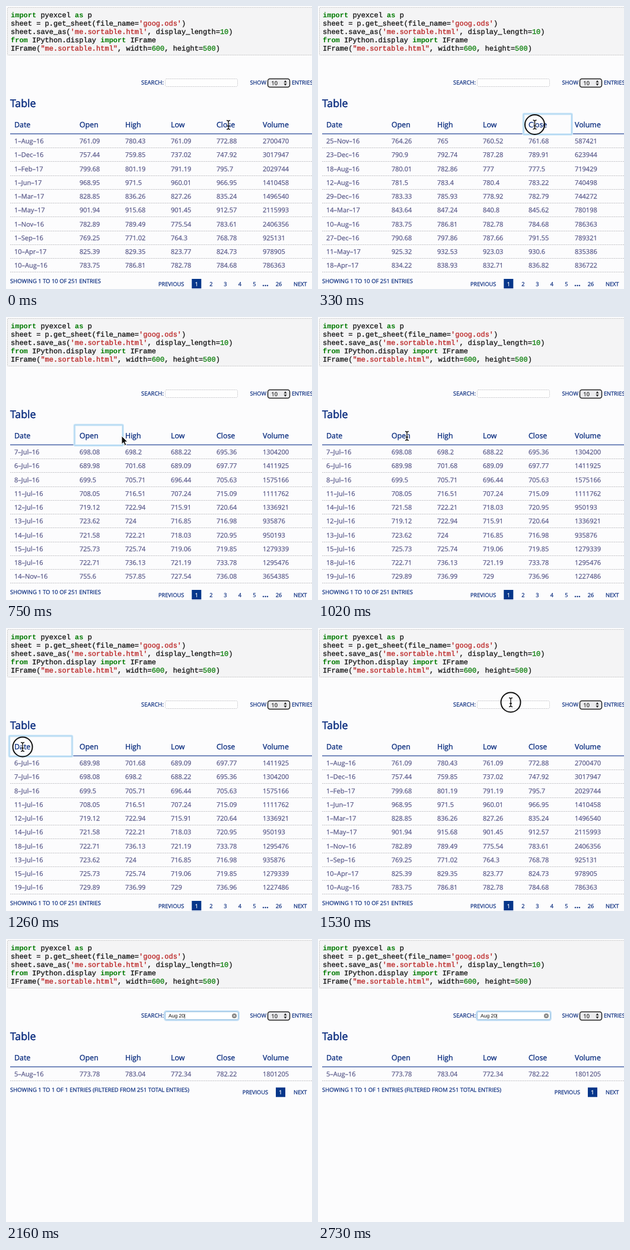
Animation of 516 by 476 pixels, one loop 2760 ms. Source, as an HTML page:

```html
<!DOCTYPE html>
<html lang="en">
<head>
<meta charset="utf-8">
<title>Sortable table</title>
<style>
  html, body { margin: 0; width: 100%; height: 100%; overflow: hidden; background: #fcfcfd; }
  svg { display: block; width: 516px; height: 476px; font-family: "Open Sans", "Noto Sans", sans-serif; }
  text { white-space: pre; fill: #0d2f80; stroke: #0d2f80; stroke-width: .25; text-rendering: geometricPrecision; }
  .code { font: 12px "Liberation Mono", "DejaVu Sans Mono", monospace; fill: #111; stroke: #111; stroke-width: .3; }
  .kw { font-weight: bold; fill: #007a00; stroke: none; }
  .str { fill: #ba2121; stroke: #ba2121; }
  .num { fill: #087d08; stroke: #087d08; }
  .title { font-size: 17.7px; stroke-width: .55; }
  .head { font-size: 12.4px; stroke-width: .35; }
  .cell { font-size: 11px; fill: #5a5a8a; stroke: #5a5a8a; }
  .small { font-size: 9.2px; }
  .on { fill: #fff; stroke: #fff; }
  .info { font-size: 9.45px; }
  .field { font: 8.5px "Liberation Sans", sans-serif; fill: #111; stroke: none; }
  .rule { stroke: #c4c4c8; stroke-dasharray: 2 1; }
  .ring { fill: none; stroke: #111; stroke-width: 2; }
</style>
</head>
<body>
<svg viewBox="0 0 516 476">
  <rect x="2.5" y="2.5" width="520" height="80" rx="1" fill="#f4f4f5" stroke="#c8c8c8" stroke-dasharray="2 1"/>
  <g id="code"></g>
  <text class="small" x="228" y="132" style="font-size:9.5px">SEARCH:</text>
  <text class="small" x="411.5" y="132">SHOW</text>
  <rect x="441.5" y="122.5" width="37" height="14" rx="3.5" fill="#ececee" stroke="#222" stroke-width="1.5"/>
  <text class="small" x="447.5" y="132.5" style="fill:#222;stroke:#222">10</text>
  <path d="M468.5 128.5l2.5-3.5 2.5 3.5zM468.5 130.5l2.5 3.5 2.5-3.5z" fill="#222"/>
  <text class="small" x="482" y="132">ENTRIES</text>
  <text class="title" x="7" y="170">Table</text>
  <g id="heads"></g>
  <path d="M7 215H516" stroke="#4a64a8" stroke-width="1.3"/>
  <g id="live"></g>
</svg>
<script>
const LOOP = 2760, STEP = 30, PITCH = 23.25, TOTAL = 251;
const columns = ['Date', 'Open', 'High', 'Low', 'Close', 'Volume'];
const colX = [14, 124, 201, 278, 355, 433];

const rows = `1-Aug-16 761.09 780.43 761.09 772.88 2700470
1-Dec-16 757.44 759.85 737.02 747.92 3017947
1-Feb-17 799.68 801.19 791.19 795.7 2029744
1-Jun-17 968.95 971.5 960.01 966.95 1410458
1-Mar-17 828.85 836.26 827.26 835.24 1496540
1-May-17 901.94 915.68 901.45 912.57 2115993
1-Nov-16 782.89 789.49 775.54 783.61 2406356
1-Sep-16 769.25 771.02 764.3 768.78 925131
10-Apr-17 825.39 829.35 823.77 824.73 978905
10-Aug-16 783.75 786.81 782.78 784.68 786363
25-Nov-16 764.26 765 760.52 761.68 587421
23-Dec-16 790.9 792.74 787.28 789.91 623944
18-Aug-16 780.01 782.86 777 777.5 719429
12-Aug-16 781.5 783.4 780.4 783.22 740498
29-Dec-16 783.33 785.93 778.92 782.79 744272
14-Mar-17 843.64 847.24 840.8 845.62 780198
27-Dec-16 790.68 797.86 787.66 791.55 789321
11-May-17 925.32 932.53 923.03 930.6 835386
18-Apr-17 834.22 838.93 832.71 836.82 836722
7-Jul-16 698.08 698.2 688.22 695.36 1304200
6-Jul-16 689.98 701.68 689.09 697.77 1411925
8-Jul-16 699.5 705.71 696.44 705.63 1575166
11-Jul-16 708.05 716.51 707.24 715.09 1111762
12-Jul-16 719.12 722.94 715.91 720.64 1336921
13-Jul-16 723.62 724 716.85 716.98 935876
14-Jul-16 721.58 722.21 718.03 720.95 950193
15-Jul-16 725.73 725.74 719.06 719.85 1279339
18-Jul-16 722.71 736.13 721.19 733.78 1295476
14-Nov-16 755.6 757.85 727.54 736.08 3654385
19-Jul-16 729.89 736.99 729 736.96 1227486
5-Aug-16 773.78 783.04 772.34 782.22 1801205`.split('\n').map(line => line.split(' '));

// Pointer path: time, x, y
const path = [
  [0, 375, 200], [120, 452, 200], [210, 452, 200], [300, 365.5, 199.5], [390, 365.5, 199.5],
  [480, 291, 200], [570, 291, 200], [690, 228, 203], [750, 195, 200], [840, 214, 200],
  [930, 214, 200], [1020, 150, 200], [1110, 146, 200], [1200, 28, 200], [1290, 28, 200],
  [1470, 325, 125], [1650, 325, 125]
];
// Clicks: time, column (-1 is the search field)
const clicks = [[150, 5], [300, 4], [480, 3], [840, 2], [1050, 1], [1230, 0], [1500, -1]];
const focuses = [...clicks, [720, 1]];
const SEARCH_FOCUS = 1590, TYPE_START = 1680, KEY_TIME = 75, QUERY = 'Aug 20';

const $ = id => document.getElementById(id);
const text = (cls, x, y, s, extra = '') => `<text class="${cls}" x="${x}" y="${y}" ${extra}>${s}</text>`;
const dashes = s => s.replace(/-/g, '–');

function pointerAt(t) {
  const i = path.findIndex(p => p[0] > t);
  if (i < 0) return null;
  const [a, b] = [path[i - 1], path[i]];
  const u = (t - a[0]) / (b[0] - a[0]), e = u * u * (3 - 2 * u);
  return [a[1] + (b[1] - a[1]) * e, a[2] + (b[2] - a[2]) * e];
}

function visibleRows(t, query) {
  const last = clicks.filter(([at, col]) => col >= 0 && t >= at + 90).pop();
  const col = last ? last[1] : 0;
  const terms = query.toLowerCase().split(' ');
  return rows
    .filter(r => terms.every(term => r.join('  ').toLowerCase().includes(term)))
    .sort((a, b) => col ? a[col] - b[col] : (a[0] < b[0] ? -1 : 1));
}

function drawTable(list, query) {
  const shown = list.slice(0, 10), n = shown.length, bottom = (10 - n) * PITCH;
  let out = shown.map((row, i) => {
    const y = 231 + i * PITCH, line = Math.round(y + 7) + .5;
    return row.map((v, c) => text('cell', colX[c], y, dashes(v))).join('') +
      `<path class="rule" d="M7 ${line}H516"/>`;
  }).join('');
  const info = query
    ? `SHOWING 1 TO ${n} OF ${list.length} ENTRIES (FILTERED FROM ${TOTAL} TOTAL ENTRIES)`
    : `SHOWING 1 TO ${n} OF ${TOTAL} ENTRIES`;
  out += text('info', 7, 466 - bottom, info);
  return out + drawPager(470.5 - bottom, query ? Math.ceil(list.length / 10) : 26);
}

function drawPager(y, count) {
  const labels = count > 6 ? [1, 2, 3, 4, 5, '...', 26] : Array.from({ length: count }, (_, i) => i + 1);
  const centre = i => count > 6
    ? [321.3, 345.8, 370, 394.3, 418.8, 437.5, 460][i]
    : 463 - 24.3 * (count - 1 - i);
  const first = centre(0);
  const label = (s, i) => text(i ? 'small' : 'small on', centre(i), y, s,
    'text-anchor="middle"' + (s === '...' ? ' style="font-weight:700;font-size:12px"' : ''));
  return text('small', first - 21, y, 'PREVIOUS', 'text-anchor="end"') +
    `<rect x="${first - 8}" y="${y - 11.5}" width="16" height="16" fill="#06368a"/>` +
    labels.map(label).join('') + text('small', 485, y, 'NEXT');
}

function drawSearch(focused, query) {
  if (!focused) return '<rect x="268.5" y="122.5" width="122" height="13" rx="2" fill="#fefefe" stroke="#cbcbcf" stroke-dasharray="2 1"/>';
  let out = '<rect x="267.5" y="121.5" width="125" height="15" rx="3" fill="#fff" stroke="#c4dff5" stroke-width="3"/>' +
    '<rect x="268.5" y="122.5" width="123" height="13" rx="2" fill="#fff" stroke="#94bfe0"/>' +
    text('field', 274, 132, query + '<tspan dx="-.6">|</tspan>');
  if (query) out += '<circle cx="385" cy="129.3" r="4" fill="#858585"/>' +
    '<path d="M383.5 127.8l3 3m0-3l-3 3" stroke="#fff"/>';
  return out;
}

function drawFocus(col) {
  const x = colX[col] - 8.5, w = col ? 81.5 : 106;
  const frame = (colour, width) =>
    `<rect x="${x}" y="181.5" width="${w}" height="34.5" rx="1" fill="none" stroke="${colour}" stroke-width="${width}"/>`;
  return frame('#dceefa', 4) + frame('#b4d9f2', 2);
}

function drawPointer([x, y], pressed) {
  const overLabel = y > 192 && y < 208 && colX.some(c => x >= c && x <= c + 42);
  const overField = x > 268 && x < 391 && y < 137;
  const beam = 'M-3-7.5Q0-7.5 0-5.5Q0-7.5 3-7.5M0-5.5V5.5M-3 7.5Q0 7.5 0 5.5Q0 7.5 3 7.5M-2 2H2';
  const shape = overLabel || overField
    ? `<path d="${beam}" fill="none" stroke="#fff" stroke-width="3"/><path d="${beam}" fill="none" stroke="#111" stroke-width="1.4"/>`
    : '<path d="M0 0V14L3.2 11 5.5 16.3 8 15.2 5.7 10H10Z" fill="#111" stroke="#fff"/>';
  return `<g transform="translate(${x} ${y})">${pressed ? '<circle class="ring" r="16.5"/>' : ''}${shape}</g>`;
}

function draw(t) {
  const typed = Math.max(0, Math.floor((t - TYPE_START) / KEY_TIME) + 1);
  const query = QUERY.slice(0, typed);
  const within = (list, span) => list.find(([at]) => t >= at && t < at + span);
  const focus = within(focuses.filter(f => f[1] >= 0), 120);
  const pointer = pointerAt(t);
  $('live').innerHTML = drawTable(visibleRows(t, query), query) +
    drawSearch(t >= SEARCH_FOCUS, query) +
    (focus ? drawFocus(focus[1]) : '') +
    (pointer ? drawPointer(pointer, within(clicks, 90)) : '');
}

const span = (cls, s) => `<tspan class="${cls}">${s}</tspan>`;
const kw = s => span('kw', s), str = s => span('str', s), num = s => span('num', s);
$('code').innerHTML = [
  `${kw('import')} pyexcel ${kw('as')} p`,
  `sheet = p.get_sheet(file_name=${str("'goog.ods'")})`,
  `sheet.save_as(${str("'me.sortable.html'")}, display_length=${num(10)})`,
  `${kw('from')} IPython.display ${kw('import')} IFrame`,
  `IFrame(${str('"me.sortable.html"')}, width=${num(600)}, height=${num(500)})`
].map((line, i) => text('code', 8, 19 + 14 * i, line)).join('');
$('heads').innerHTML = columns.map((name, i) => text('head', colX[i], 203.5, name)).join('');

let shownStep = -1;
const start = performance.now();
function tick() {
  const t = Math.floor((performance.now() - start) % LOOP / STEP) * STEP;
  if (t !== shownStep) draw(shownStep = t);
  requestAnimationFrame(tick);
}
tick();
</script>
</body>
</html>
```
